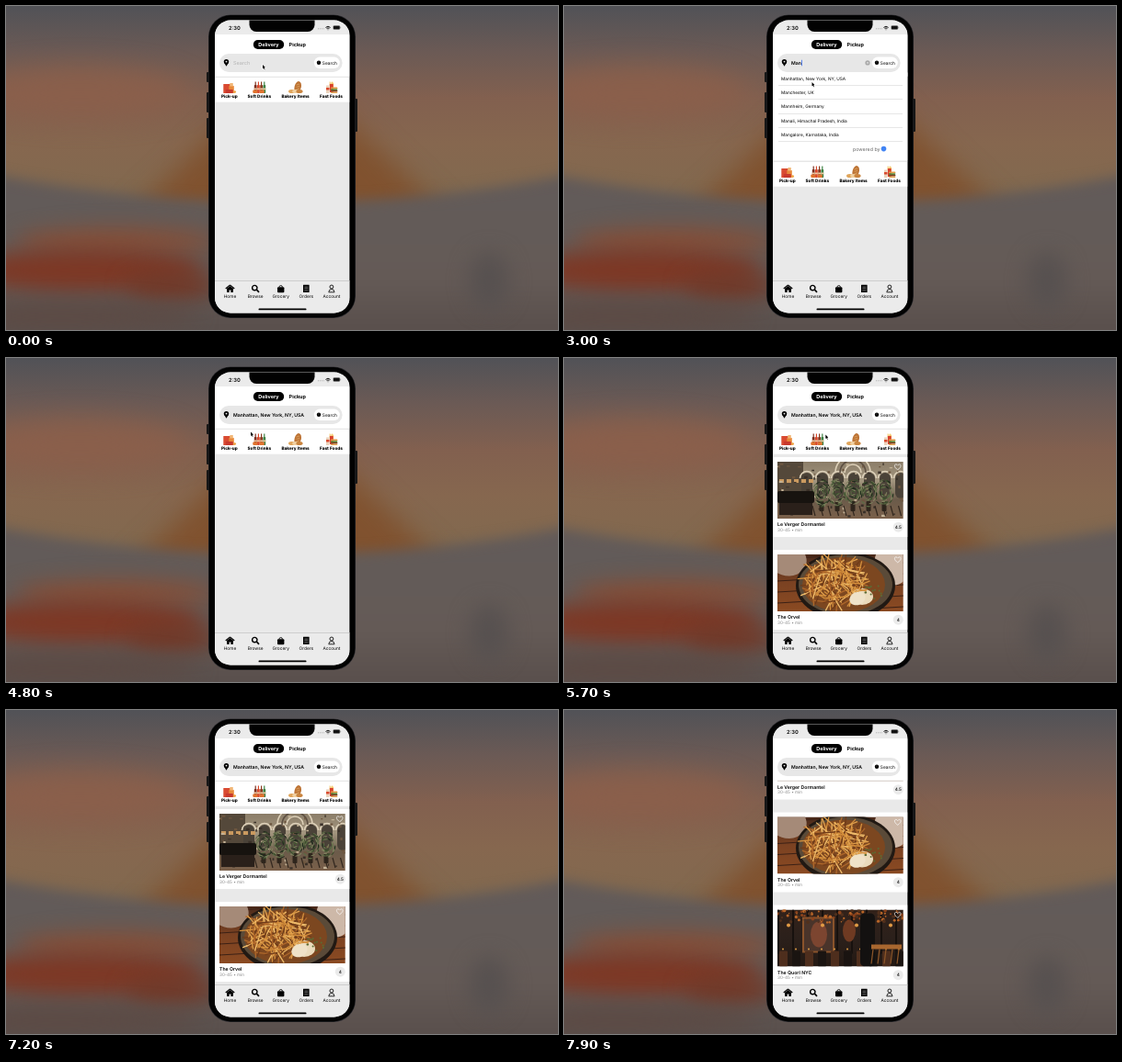
An HTML page with a canvas for the animation above (8 s loop, 600 by 353 pixels).

```html
<!DOCTYPE html>
<html lang="en">
<head>
<meta charset="utf-8">
<title>Food delivery app</title>
<style>
html, body { margin: 0; width: 100%; height: 100%; overflow: hidden; background: #554d4a; }
canvas { display: block; width: 600px; height: 353px; }
</style>
</head>
<body>
<canvas id="stage"></canvas>
<script>
const W = 600, H = 353, LOOP = 8000;
const stage = document.getElementById('stage');
const dpr = window.devicePixelRatio || 1;
stage.width = W * dpr;
stage.height = H * dpr;
let c = stage.getContext('2d');
c.textRendering = 'geometricPrecision';

const FONT = 'Inter, "Liberation Sans", sans-serif';
const FOCUS = 500, SUGGEST = 2300, PICK = 3700, LOADED = 5200, SCROLL = 7300;
const LEFT = 227, WIDTH = 146.6;
const PLACES = ['Manhattan, New York, NY, USA', 'Manchester, UK', 'Mannheim, Germany',
  'Manali, Himachal Pradesh, India', 'Mangalore, Karnataka, India'];

function rect(x, y, w, h, color, r = 0) {
  c.fillStyle = color;
  c.beginPath();
  c.roundRect(x, y, w, h, r);
  c.fill();
}
function oval(x, y, rx, ry, color, turn = 0) {
  c.fillStyle = color;
  c.beginPath();
  c.ellipse(x, y, rx, ry, turn, 0, 7);
  c.fill();
}
const dot = (x, y, r, color) => oval(x, y, r, r, color);
const bar = (y, h, color) => rect(LEFT, y, WIDTH, h, color);
function tri(x1, y1, x2, y2, x3, y3, color) {
  c.fillStyle = color;
  c.beginPath();
  c.moveTo(x1, y1);
  c.lineTo(x2, y2);
  c.lineTo(x3, y3);
  c.fill();
}
function line(x1, y1, x2, y2, color, w = 1) {
  c.strokeStyle = color;
  c.lineWidth = w;
  c.beginPath();
  c.moveTo(x1, y1);
  c.lineTo(x2, y2);
  c.stroke();
}
function ring(x, y, r, color, w, from = 0, to = 7) {
  c.strokeStyle = color;
  c.lineWidth = w;
  c.beginPath();
  c.arc(x, y, r, from, to);
  c.stroke();
}
const arch = (x, y, r, color, w) => ring(x, y, r, color, w, Math.PI, 2 * Math.PI);
// y is the middle of the capitals
function text(s, x, y, size, weight = 400, color = '#000', align = 'left') {
  c.font = `${weight} ${size}px ${FONT}`;
  c.fillStyle = color;
  c.textAlign = align;
  c.fillText(s, x, y + size * 0.36);
}
function clipBox(x, y, w, h, draw, r = 0) {
  c.save();
  c.beginPath();
  c.roundRect(x, y, w, h, r);
  c.clip();
  draw();
  c.restore();
}
function repeat(n, draw) {
  for (let i = 0; i < n; i++) draw(i);
}
function seeded(seed) {
  return () => (seed = (seed * 16807) % 2147483647) / 2147483647;
}
function fade(y0, y1, ...colors) {
  const g = c.createLinearGradient(0, y0, 0, y1);
  colors.forEach((color, i) => g.addColorStop(i / (colors.length - 1), color));
  return g;
}
const smooth = p => p * p * (3 - 2 * p);
const ramp = (t, from, length) => smooth(Math.min(1, Math.max(0, (t - from) / length)));

function makeBackdrop() {
  const layer = document.createElement('canvas');
  layer.width = stage.width;
  layer.height = stage.height;
  const main = c;
  c = layer.getContext('2d');
  c.scale(dpr, dpr);
  rect(0, 0, W, H, fade(0, 200, '#515257', '#6b5a55', '#82604f', '#86674f', '#82694f'));
  c.filter = `blur(${14 * dpr}px)`;
  oval(80, 95, 120, 28, '#8a5f4b');
  tri(130, 232, 305, 62, 485, 232, '#80522f');
  c.filter = `blur(${7 * dpr}px)`;
  c.fillStyle = fade(185, H, '#615a59', '#635b58', '#645a56', '#594f4c');
  c.beginPath();
  c.moveTo(-40, 400);
  c.lineTo(-40, 178);
  c.quadraticCurveTo(300, 250, 640, 178);
  c.lineTo(640, 400);
  c.fill();
  c.filter = `blur(${11 * dpr}px)`;
  oval(120, 256, 110, 15, '#84503a');
  oval(85, 288, 130, 23, '#7d3825');
  oval(180, 305, 50, 14, '#713827');
  oval(60, 338, 150, 14, '#5c4a44');
  oval(525, 300, 22, 32, '#575150');
  c = main;
  return layer;
}

function drawPhone() {
  rect(218, 72, 3, 11, '#171717', 1);
  repeat(2, i => rect(218, 94 + i * 28, 3, 22, '#171717', 1));
  rect(379, 101, 3, 36, '#171717', 1);
  rect(220, 9.5, 160, 330.5, '#2c2c30', 24);
  rect(220.6, 10.1, 158.8, 329.3, '#020202', 23.4);
}

function drawStatus() {
  bar(15, 16, '#ebebeb');
  rect(264.5, 8, 71, 20, '#020202', 7.5);
  text('2:30', 248.4, 23.5, 5.8, 600, '#000', 'center');
  repeat(4, i => dot(339.5 + i * 1.9, 24.8, 0.5, '#999'));
  repeat(3, i => ring(350, 26, 0.4 + i * 1.6, '#111', 1, 3.93, 5.5));
  rect(355.4, 21.2, 7.8, 4.6, '#888', 1.2);
  rect(356, 21.8, 6.6, 3.4, '#111', 0.7);
  rect(363.4, 22.7, 0.7, 1.6, '#888');
}

function drawSearch(t) {
  bar(31, 45.8, '#fff');
  rect(268.8, 37, 33.4, 10, '#000', 5);
  text('Delivery', 285.5, 42.1, 5.5, 700, '#fff', 'center');
  text('Pickup', 316.8, 42.1, 5.5, 700, '#000', 'center');
  rect(232, 52, 133.6, 20, '#e7e7e7', 10);
  tri(236.9, 61.4, 242.1, 61.4, 239.5, 65.8, '#000');
  dot(239.5, 60.6, 2.7, '#000');
  dot(239.5, 60.6, 0.95, '#e7e7e7');
  rect(334.8, 55.6, 28, 12.4, '#fff', 6.2);
  dot(340, 61.8, 2.2, '#000');
  line(340, 60.4, 340, 61.9, '#bbb', 0.35);
  text('Search', 343.8, 61.9, 4.8);

  const picked = t >= PICK;
  const typed = picked ? PLACES[0] : 'Man'.slice(0, Math.max(0, Math.floor((t - 650) / 300)));
  if (typed) text(typed, 247, 62, 5.15, 600);
  else text('Search', 247, 62, 5.5, 400, '#b4b4b4');
  if (picked || t < FOCUS) return;
  c.font = `600 5.15px ${FONT}`;
  rect(247.3 + c.measureText(typed).width, 58.7, 0.8, 6.6, '#3b6ff0');
  if (!typed) return;
  dot(330, 61.9, 2.6, '#a9a9a9');
  for (const d of [-0.9, 0.9]) line(330 - d, 61, 330 + d, 62.8, '#eee', 0.6);
}

function drawSuggestions() {
  bar(72.5, 96, '#fff');
  PLACES.forEach((place, i) => {
    const y = 78.8 + i * 15.35;
    text(place, 236, y, 4.75);
    rect(233, y + 7.4, 135, 0.5, '#cfcfcf');
  });
  text('powered by', 314, 155.6, 5.3, 400, '#666');
  dot(347.5, 155.6, 2.8, '#4285f4');
}

// Category pictures stand on y = 0, centred on x = 0
function bags() {
  rect(-6.5, -10, 7.5, 10, '#d94a31', 0.6);
  rect(-0.5, -8, 5.5, 8, '#e8893a', 0.6);
  rect(0.5, -11, 3.5, 3.5, '#f1b777', 0.5);
  rect(-4, -4, 8, 4, '#c8392d', 0.8);
  dot(5.8, -1.4, 1.4, '#eda23f');
}
function bottles() {
  ['#7d3020', '#d8482c', '#8a3b22', '#3f8245'].forEach((color, i) => {
    const x = -5.5 + i * 3.2;
    rect(x, -9, 2.8, 9, color, 0.7);
    rect(x + 0.8, -12.6, 1.2, 5, color);
    rect(x, -5.6, 2.8, 1.8, '#f1c9a0');
  });
  repeat(2, i => rect(-7 + i * 7.5, -3.5, 5, 3.5, '#e0742f', 1));
}
function bread() {
  oval(2.6, -6.8, 3.6, 6.2, '#bd7436', 0.25);
  repeat(3, i => line(1, -9 + i * 2.4, 4.4, -10 + i * 2.4, '#e9b670', 0.6));
  repeat(3, i => oval(-4 + i * 4.2, -2, 3.6, 2, ['#e0a55b', '#f0d0a0', '#c9843f'][i]));
}
function burger() {
  repeat(4, i => rect(-1.8 + i * 1.1, -12.4 + (i % 2), 0.8, 5, '#f0b840'));
  rect(-1.6, -10, 3.8, 9, '#d8402d', 0.5);
  rect(-5.5, -8.6, 3.5, 8.6, '#ead3bb', 0.6);
  rect(-5.5, -6, 3.5, 2.5, '#d94b30');
  ['#e29a44', '#5b8f3c', '#79391f', '#e1a050'].forEach((color, i) => rect(-0.5, -6.4 + i * 1.6, 7.4, 1.7, color, 0.8));
}
const CATEGORIES = [['Pick-up', 242.8, bags], ['Soft Drinks', 275.3, bottles],
  ['Bakery Items', 314.6, bread], ['Fast Foods', 353.5, burger]];
function drawCategories(top) {
  bar(top, 28, '#fff');
  bar(top, 0.8, '#cfcfcf');
  for (const [name, x, icon] of CATEGORIES) {
    c.save();
    c.translate(x, top + 18.2);
    icon();
    c.restore();
    text(name, x, top + 21.5, 4.7, 800, '#000', 'center');
  }
}

// Pictures are drawn in a box of 137 by 62
const pick = (list, rnd) => list[Math.floor(rnd() * list.length)];
function hallPicture() {
  const rnd = seeded(31);
  rect(0, 0, 137, 62, fade(0, 62, '#8b7d68', '#a3967f', '#6b5b4a', '#7a604a'));
  rect(0, 0, 28, 36, '#54483a');
  repeat(7, i => {
    const x = 32 + i * 17;
    rect(x - 6, 12, 12, 28, '#4a4238', 6);
    arch(x, 18, 7.5, '#dcd0b9', 1.6);
  });
  repeat(3, i => arch(82, 12, 9 + i * 5, i % 2 ? '#5d4f42' : '#ddd0b8', 1.6));
  repeat(5, i => rect(2 + i * 8, 19, 5, 4, '#c9995f'));
  repeat(90, () => rect(rnd() * 137, rnd() * 60, 1 + rnd() * 3, 1 + rnd() * 2, pick(['#3a3028', '#c2b195', '#6d563f'], rnd)));
  repeat(12, i => line(38 + i * 8.5, 48, 41 + i * 8.5, 59, '#33281f', 1.2));
  repeat(5, i => {
    const x = 48 + i * 17;
    rect(x - 2.5, 43, 5, 11, '#2e251c', 1);
    repeat(60, () => {
      const a = rnd() * 6.28, r = Math.sqrt(rnd());
      oval(x + Math.cos(a) * r * 10, 34 + Math.sin(a) * r * 15, 0.6, 2.4, pick(['#1f2c1c', '#3a4d2c', '#5c6b45', '#80835f'], rnd), a);
    });
  });
  rect(0, 32, 40, 13, '#17130f', 2);
  rect(2, 45, 36, 13, '#2a201a');
}
function bowlPicture() {
  const rnd = seeded(77);
  rect(0, 0, 137, 62, fade(0, 62, '#4a2a1b', '#7b4222', '#8a4a22'));
  repeat(6, i => line(0, 5 + i * 12, 137, i * 12 - 3, '#3b2015', 1));
  oval(124, 12, 18, 22, '#cdb8a8', -0.4);
  oval(10, 5, 22, 18, '#a58a78', 0.3);
  oval(74, 34, 54, 37, '#211913');
  oval(74, 33, 51, 33, '#5a4a38');
  oval(72, 33, 45, 30, '#7c4720');
  oval(92, 46, 12, 9, '#eadbbc');
  repeat(150, () => {
    const a = rnd() * 6.28, r = Math.sqrt(rnd()) * 0.8, turn = rnd() * 6.28, l = 5 + rnd() * 9;
    const x = 64 + Math.cos(a) * r * 40, y = 30 + Math.sin(a) * r * 30;
    line(x - Math.cos(turn) * l, y - Math.sin(turn) * l, x + Math.cos(turn) * l, y + Math.sin(turn) * l,
      pick(['#d48f3c', '#b0682a', '#eebb6a', '#6f3a18', '#e0a04c'], rnd), 1.3);
  });
  oval(87, 48, 9, 7, '#efe2c8', -0.4);
  repeat(14, () => dot(95 + rnd() * 18, 34 + rnd() * 16, 1, '#5a6b34'));
}
function loungePicture() {
  const rnd = seeded(12);
  rect(0, 0, 137, 62, fade(0, 62, '#33221a', '#2b201b', '#241913'));
  repeat(9, i => rect(i * 16, 0, 2, 48, '#17110e'));
  rect(27, 8, 35, 39, '#8a532b');
  rect(29, 10, 31, 35, '#4a342a');
  oval(45, 27, 9, 14, '#7c4530');
  oval(78, 23, 7, 12, '#6f3a22');
  repeat(110, () => dot(rnd() * 137, rnd() * 14, 0.6 + rnd() * 1.4, pick(['#8b431c', '#51301c', '#b96628'], rnd)));
  repeat(10, i => {
    rect(2 + i * 14, 45, 9, 17, i % 2 ? '#1a1411' : '#4e2e1d', 1);
    dot(6 + i * 14, 43, 0.9, '#efa947');
  });
  rect(90, 4, 16, 58, '#131110', 5);
  rect(102, 38, 33, 5, '#a8672f');
  repeat(5, i => line(104 + i * 7, 43, 102 + i * 7, 59, '#8c5629', 1.2));
  repeat(4, i => dot(12 + i * 37, 17, 2, '#e29b45'));
}

const CARDS = [
  ['Le Verger Dormantel', '4.5', hallPicture],
  ['The Orvel', '4', bowlPicture],
  ['The Quorl NYC', '4', loungePicture]
];
function heart(x, y) {
  c.strokeStyle = '#fff';
  c.lineWidth = 0.7;
  c.beginPath();
  c.moveTo(x, y + 3);
  c.bezierCurveTo(x - 6, y - 1, x - 2.5, y - 5, x, y - 1.7);
  c.bezierCurveTo(x + 2.5, y - 5, x + 6, y - 1, x, y + 3);
  c.stroke();
}
function drawCard([name, rating, picture], top) {
  bar(top, 87, '#fff');
  c.save();
  c.translate(232, top + 5);
  clipBox(0, 0, 136.7, 62, picture);
  c.restore();
  heart(362.7, top + 10.8);
  text(name, 232, top + 73.4, 5.2, 600);
  text('30-45 • min', 232, top + 79.2, 4.7, 400, '#8a8a8a');
  dot(363.3, top + 76.2, 5.5, '#ebebeb');
  text(rating, 363.3, top + 76.3, 4.7, 500, '#000', 'center');
}

// Tab icons are centred on 0, 0
function house() {
  rect(-3.4, -0.6, 6.8, 4.6, '#000', 0.4);
  rect(-0.9, 1.4, 1.8, 2.6, '#ebebeb');
  tri(-3.6, 0, 0, -3, 3.6, 0, '#000');
  for (const side of [-1, 1]) line(side * 4.8, 0, 0, -4, '#000', 1.1);
}
function magnifier() {
  ring(-0.8, -0.9, 2.7, '#000', 1.4);
  line(1.2, 1, 3.9, 3.8, '#000', 1.8);
}
function bag() {
  rect(-3.7, -1.7, 7.4, 5.9, '#000', 1);
  arch(0, -1.6, 1.8, '#000', 0.9);
}
function receipt() {
  rect(-3.3, -4.2, 6.6, 8.3, '#000', 0.3);
  repeat(3, i => rect(-2, -2.2 + i * 1.7, 4, 0.55, '#bbb'));
}
function person() {
  ring(0, -2, 1.95, '#000', 0.85);
  arch(0, 3.6, 3, '#000', 0.85);
  line(-3.3, 3.8, 3.3, 3.8, '#000', 0.85);
}
const TABS = [['Home', house], ['Browse', magnifier], ['Grocery', bag], ['Orders', receipt], ['Account', person]];
function drawTabs() {
  bar(299.3, 36, '#ebebeb');
  bar(299.3, 0.7, '#c4c4c4');
  TABS.forEach(([name, icon], i) => {
    const x = 243.5 + i * 27.6;
    c.save();
    c.translate(x, 308);
    icon();
    c.restore();
    text(name, x, 316.2, 4.8, 400, '#000', 'center');
  });
  rect(274.5, 329.5, 52, 1.8, '#000', 0.9);
}

// Each stop: when the pointer sets off, and where it goes
const STOPS = [[600, 261.7, 101.5], [2100, 269.5, 83], [3800, 266, 80.5], [5000, 284.3, 83.5]];
function drawPointer(t) {
  if (t > 6700) return;
  let x = 279, y = 64;
  for (const [from, toX, toY] of STOPS) {
    const p = ramp(t, from, 700);
    x += (toX - x) * p;
    y += (toY - y) * p;
  }
  c.save();
  c.translate(x, y);
  tri(-0.5, -1, -0.5, 5.2, 3.9, 3.5, '#fff');
  line(1, 2.8, 2.3, 5.6, '#fff', 1.6);
  tri(0, 0, 0, 4.2, 2.9, 3, '#000');
  line(1, 2.8, 2.1, 5.2, '#000', 0.8);
  c.restore();
}

function drawScreen(t) {
  const listOpen = t >= SUGGEST && t < PICK;
  const scroll = 97.5 * ramp(t, SCROLL, 600);
  bar(15, 320, '#e9e9e9');
  clipBox(LEFT, 76.7, WIDTH, 223, () => {
    drawCategories(76.8 + (listOpen ? 92 : -scroll));
    if (t >= LOADED) CARDS.forEach((card, i) => drawCard(card, 108 + i * 101 - scroll));
  });
  drawSearch(t);
  if (listOpen) drawSuggestions();
  drawStatus();
  drawTabs();
}

const backdrop = makeBackdrop();
let start;
function tick(now) {
  start ??= now;
  const t = (now - start) % LOOP;
  c.setTransform(1, 0, 0, 1, 0, 0);
  c.drawImage(backdrop, 0, 0);
  c.scale(dpr, dpr);
  drawPhone();
  clipBox(LEFT, 15.6, WIDTH, 318.8, () => drawScreen(t), 17);
  drawPointer(t);
  requestAnimationFrame(tick);
}
requestAnimationFrame(tick);
</script>
</body>
</html>
```
